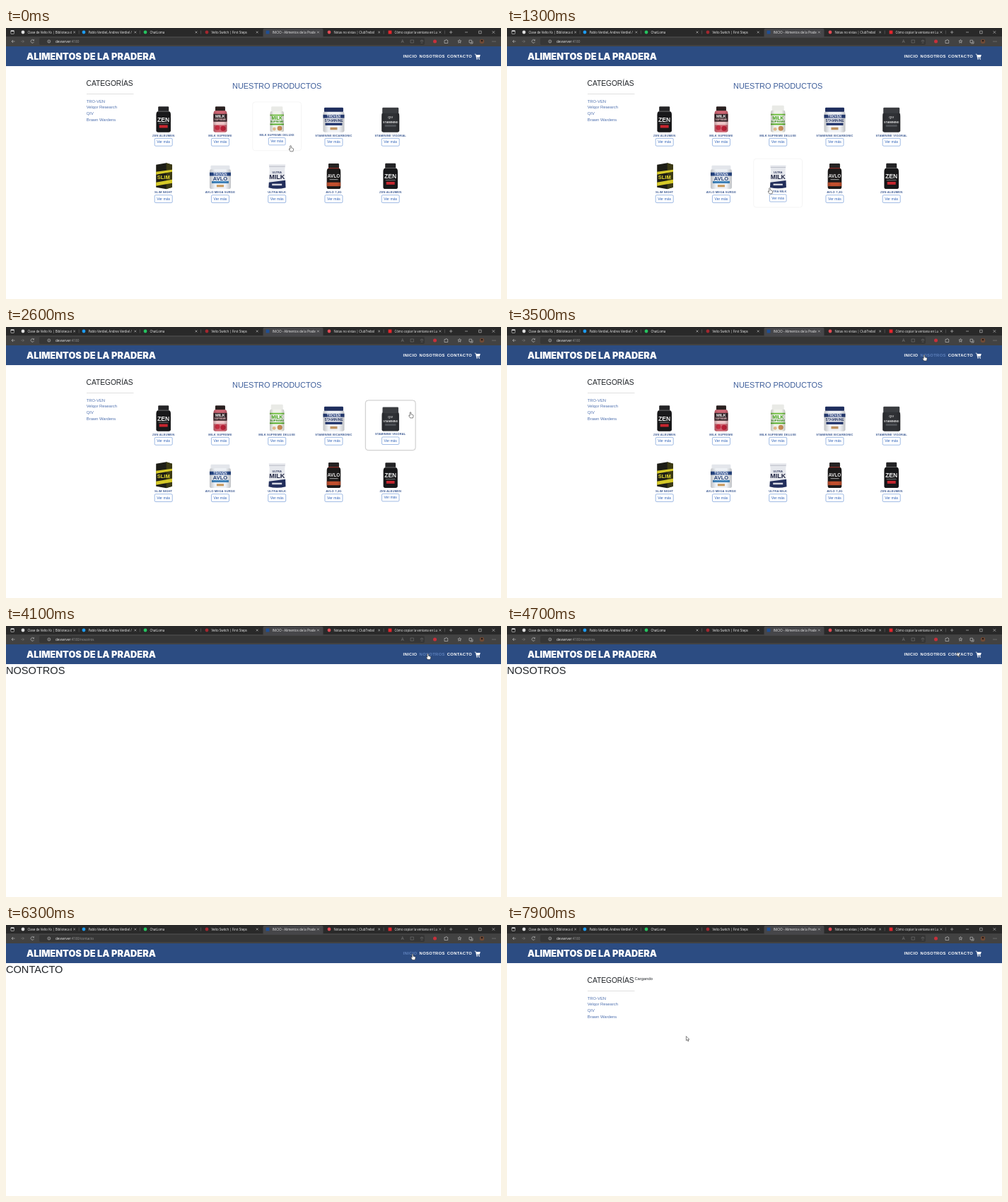
An HTML page for the animation above (8 s loop, 700 by 384 pixels).

```html
<!DOCTYPE html>
<html lang="es">
<head>
<meta charset="utf-8">
<title>Tienda</title>
<style>
html, body { margin: 0; width: 100%; height: 100%; overflow: hidden; background: #fff; }
svg { display: block; width: 100%; height: 100%; font-family: "Liberation Sans", Arial, sans-serif; }
.ui { font-family: "Open Sans", "Noto Sans", sans-serif; }
.brand { font-family: Inter, sans-serif; font-weight: 900; }
.nav { font-weight: 700; letter-spacing: .35px; }
.name { font-weight: 700; letter-spacing: .15px; }
.mid { text-anchor: middle; }
.tag { text-anchor: middle; font-weight: 700; }
.line { fill: none; stroke: #ccc; stroke-width: .6; }
</style>
</head>
<body>
<svg id="stage" viewBox="0 0 700 384" preserveAspectRatio="none"></svg>
<script>
const LOOP = 8000, STEP = 100;
const stage = document.getElementById('stage');

const text = (x, y, s, size, fill, cls = '', id = '') =>
  `<text x="${x}" y="${y}" font-size="${size}" fill="${fill}" class="${cls}" id="${id}">${s}</text>`;
const rect = (x, y, w, h, fill, r = 0, more = '') =>
  `<rect x="${x}" y="${y}" width="${w}" height="${h}" rx="${r}" fill="${fill}" ${more}/>`;
const dot = (x, y, r, fill) => `<circle cx="${x}" cy="${y}" r="${r}" fill="${fill}"/>`;
const line = (d, more = '') => `<path class="line" d="${d}" ${more}/>`;
const tag = (y, s, size, fill) => text(0, y, s, size, fill, 'tag');
const band = (w, y, h, fill) => rect(-w / 2, y, w, h, fill);

// Browser frame
const tabs = [
  [24, 'Clase de Velto Ks | Biblioteca d', '#ddd'],
  [110, 'Pablo Verdiel, Andres Verdiel / C', '#1d9bf0'],
  [197, 'ChatLoma', '#25c35f'],
  [284, 'Velto Switch | First Steps', '#a3272f'],
  [370, 'INICIO - Alimentos de la Pradera', '#1f4f94'],
  [457, 'Notas no vistas | ClubTrebol', '#e04b55'],
  [543, 'Cómo copiar la ventana en Lumo', '#e3262e']
];

function browser() {
  let s = rect(0, 0, 700, 13, '#292929') + rect(0, 12, 700, 14, '#424242') +
    rect(363.5, .8, 85, 13, '#464649', 2) + rect(47, 14, 545, 10, '#363636', 2);
  s += rect(6.8, 3.6, 4.6, 4.8, 'none', .7, 'stroke="#ddd" stroke-width=".6"') + rect(6.8, 3.6, 4.6, 1.4, '#ddd');
  tabs.forEach(([x, label, color], i) => {
    const end = 17 + (i + 1) * 86.2, clip = 'tab' + i;
    s += i > 3 && i != 5 ? rect(x - 2.4, 3.6, 4.8, 4.8, color) : dot(x, 6, 2.4, color);
    s += `<clipPath id="${clip}">${rect(x, 0, end - 10.5 - x, 12, '#000')}</clipPath>`;
    s += `<g clip-path="url(#${clip})">${text(x + 6.4, 7.6, label, 4.4, '#eee', 'ui')}</g>`;
    s += line(`M${end - 8} 4.6l2.8 2.8m0-2.8l-2.8 2.8`);
    if (i != 3 && i != 4) s += line(`M${end} 3.5v5`, 'opacity=".4"');
  });
  s += line('M627 6h4.4M629.2 3.8v4.4M649 6h4M668.6 4.2h3.6v3.6h-3.6zM687.6 4.2l3.6 3.6m0-3.6l-3.6 3.6');
  s += line('M12.4 19H8m2-2l-2 2 2 2M39.3 17.6a2.3 2.3 0 1 0 .2 2.2m-.1-3.6v1.6h-1.6');
  s += line('M21 19h4.4m-2-2l2 2-2 2', 'opacity=".4"');
  s += `<circle class="line" cx="60.8" cy="19" r="2"/>` + line('M60.8 18.7v1.4M60.8 17.7v.4');
  s += line('M559 21l1.7-4.4 1.7 4.4m-2.8-1.5h2.2M572 17h4.4v4H572zM586 18.6h4l-2-2zm.5 2.4h3', 'opacity=".4"');
  s += dot(606.5, 19, 2.5, '#c6303b');
  s += line('M620 17.5h1.7a1 1 0 0 1 2 0h1v4h-4.7zM639 18.2h1.6l.8-1.7.8 1.7h1.6l-1.2 1.2.4 1.8-1.6-1-1.6 1 .4-1.8z');
  s += line('M655 17.2h3.6v3.6H655zM656.4 22h3.6v-3.4');
  s += dot(673, 19, 3.3, '#6f4a36') + dot(673, 18, 1.3, '#241b18');
  for (const x of [688, 690, 692]) s += dot(x, 19, .45, '#ddd');
  return s + `<text x="70" y="20.7" font-size="4.7" class="ui" fill="#eee">devserver<tspan id="path" fill="#9a9a9a"></tspan></text>`;
}

function header() {
  const cart = '<path d="M662.7 36.8h1.7l.4 1.2h6l-1 3.8h-4.1l.2.9h3.9v.7h-4.5l-1.3-5.9h-1.3z" fill="#fff"/>';
  return rect(0, 26, 700, 28, '#2c4c82') +
    text(29, 45, 'ALIMENTOS DE LA PRADERA', 12.8, '#fff', 'brand') +
    text(561.6, 42.2, 'INICIO', 5.83, '#fff', 'nav', 'inicio') +
    text(584.6, 42.2, 'NOSOTROS', 5.83, '#fff', 'nav', 'nosotros') +
    text(623.8, 42.2, 'CONTACTO', 5.83, '#fff', 'nav', 'contacto') +
    cart + dot(666, 44, .75, '#fff') + dot(669.3, 44, .75, '#fff');
}

// Product art, drawn around the centre of its card
function jar(w, neck, top, lidH, body, lid, label) {
  const b = top + lidH, r = w / 2, n = neck / 2;
  const shape = fill => `<path d="M${-r} ${b + 5}Q${-r} ${b} ${-n} ${b}H${n}Q${r} ${b} ${r} ${b + 5}` +
    `V6Q${r} 8.4 ${r - 3} 8.4H${3 - r}Q${-r} 8.4 ${-r} 6Z" fill="${fill}"/>`;
  return rect(-n, top, neck, lidH + .5, lid, 1.2) + shape(body) + label + shape('url(#shade)');
}
const black = jar(20.5, 15, -28, 7, '#19191b', '#242426',
  band(15, -21.6, .8, '#777') + tag(-6.5, 'ZEN', 8.6, '#f2f2f2') +
  band(14, -4.6, .7, '#999') + band(12, -1.8, 4, '#c7262f'));
const products = [
  ['ZEN ALBUMEN', black],
  ['MILK SUPREME', jar(19, 14, -28, 6, '#cf6573', '#2a2020',
    band(19, -17.5, 11, '#33262a') + tag(-12.6, 'MILK', 5.6, '#fff') + tag(-8.2, 'SUPREME', 3.4, '#f5c9cf') +
    band(19, -6.5, 4.5, '#ecc6c8') + dot(-4, 2, 3.4, '#c52c41') + dot(4, 3, 3.6, '#b51f36'))],
  ['MILK SUPREME DELUXE', jar(20.5, 17, -29.5, 7, '#f0f1ec', '#e9eae6',
    band(20.5, -17.6, 2, '#73c043') + tag(-9.8, 'MILK', 6.6, '#43a518') + tag(-5.4, 'SUPREME', 4, '#3b8c20') +
    band(20.5, -4, 2, '#58b02c') + dot(4, 3, 3.5, '#c58b56') + dot(-4, 4, 2.4, '#dfb98b'))],
  ['STAMININE BICARBONIC', jar(30, 27, -26.5, 6, '#f0f2f5', '#1e2d5d',
    band(30, -16.5, 4.8, '#2b427d') + tag(-12.4, 'TROVEN', 4.6, '#fff') +
    tag(-6.4, 'STAMININE', 4.8, '#1b2c5e') + band(24, -4.8, 3.4, '#24376f') + band(10, 1.5, 3.5, '#bd9262'))],
  ['STAMININE VIGORAL', jar(25, 23, -26.5, 8, '#2f3135', '#3a3c40',
    tag(-11, 'QIV', 4, '#c9c9c9') + tag(-4.5, 'STAMININE', 4, '#e5e5e5') + band(16, -2.3, 3, '#4d5055'))],
  ['SLIM NIGHT', '<path d="M-10.5-26L4-28.5 12.3-26V6L4 8.6-10.5 6z" fill="#1d1d16"/>' +
    '<path d="M4-28.5L12.3-26V6L4 8.3z" fill="#3c3a14"/>' +
    '<path d="M-10.5-16L12.3-19V-16L-10.5-12zM-10.5-1L12.3-5V0L-10.5 4z" fill="#d5c928"/>' +
    tag(-6, 'SLIM', 7.5, '#e8dc30')],
  ['AVLO MEGA SURGE', jar(30, 27, -25, 5.5, '#eef1f5', '#e3e6eb',
    band(30, -15, 4.8, '#294b8d') + tag(-11, 'TROVEN', 4.6, '#fff') + tag(-4, 'AVLO', 7.5, '#1f3a70') +
    band(24, -2.8, 3.2, '#3f83ba') + band(10, 2.6, 3, '#c79759'))],
  ['ULTRA MILK', '<path d="M-11.5-26.5H12L11-19 12.3 6.5Q0 9.5-11.8 6.5L-10.5-19z" fill="#e6e8ed"/>' +
    '<path d="M-11.4-1L11.9-4 12.3 6.5Q0 9.5-11.8 6.5z" fill="#222e5b"/>' + rect(-11, -24, 22.4, 1, '#b9bdc7') +
    tag(-14, 'ULTRA', 4, '#30395d') + tag(-5.5, 'MILK', 9, '#1f2441') + band(14, 1, 2.5, '#d6d8e1')],
  ['AVLO 7,2G', jar(19.5, 15, -27.6, 7, '#1c1a1a', '#252323',
    band(15, -21.4, .9, '#b2322a') + tag(-7.5, 'AVLO', 6.6, '#f0f0f0') +
    band(12, -5.5, 1, '#aaa') + band(19.5, -1, 5.5, '#c2502e'))],
  ['ZEN ALBUMEN', black]
];
const HALF = 36.3;
const centre = i => [222.7 + i % 5 * 80.25, 139.3 + Math.floor(i / 5) * 80.4];

const card = ([name, art], i) => `<g id="card${i}">` +
  rect(-HALF, -HALF, 2 * HALF, 2 * HALF, 'none', 4, `id="edge${i}" stroke-width=".6"`) + art +
  text(0, 14.3, name, 4.1, '#3f5c94', 'name mid') +
  rect(-12.5, 17, 25, 10.9, '#fff', 1.6, 'stroke="#3f74c8" stroke-width=".5"') +
  text(0, 24.2, 'Ver más', 5.1, '#2f62b8', 'mid') + '</g>';

const brands = ['TRO-VEN', 'Velqor Research', 'QIV', 'Brawn Wardens'];
stage.innerHTML = `<defs><linearGradient id="shade">
  <stop offset="0" stop-opacity=".2"/><stop offset=".25" stop-opacity="0"/>
  <stop offset=".75" stop-opacity="0"/><stop offset="1" stop-opacity=".2"/></linearGradient></defs>` +
  rect(0, 0, 700, 384, '#fff') + browser() + header() +
  '<g id="home">' + text(113.6, 81.8, 'CATEGORÍAS', 10.2, '#212529') + line('M114 93.5h66.5') +
  brands.map((b, i) => text(113.8, 105.7 + i * 8.75, b, 5.83, '#4d6fae')).join('') + '</g>' +
  text(180.4, 78.3, 'Cargando', 5.83, '#212529', '', 'loading') +
  '<g id="shop">' + text(320, 86, 'NUESTRO PRODUCTOS', 10.95, '#3f5f9b') + products.map(card).join('') + '</g>' +
  text(0, 68.4, '', 14.58, '#212529', '', 'heading') +
  '<path id="cursor" stroke="#222" stroke-width=".55" fill="#fff" stroke-linejoin="round"/>';

// Motion
const HAND = 'M-.8.6Q0-.6.8.6V3.2L3.5 4Q4.3 4.3 4.1 5.4L3.4 8.4H-.4L-2.2 5.6Q-2.5 4.5-1.6 4.6L-.8 5.3Z';
const ARROW = 'M0 0V6.2L1.5 4.9 2.5 7.2 3.5 6.8 2.5 4.6H4.4Z';
const route = [
  [0, 402.5, 166.5], [100, 402.5, 166.5], [500, 392, 196], [900, 376, 224], [1300, 371.5, 226.5],
  [1500, 396, 256], [1800, 455, 307], [1900, 474, 313], [2200, 520, 250], [2470, 556, 174],
  [2600, 572, 120.5], [2800, 574, 116], [3200, 585, 62], [3500, 590, 39.5], [4000, 590, 39.5],
  [4700, 636.5, 37], [4900, 637.5, 38.5], [5400, 637.5, 38.5], [5800, 612, 44], [6200, 577, 42],
  [6300, 575, 41], [6900, 575, 41], [7100, 470, 85], [7400, 252.8, 157], [7800, 252.8, 157], [7900, 253.4, 157.6]
];
const links = { inicio: [6100, 7000], nosotros: [3400, 4300], contacto: [5000, 5600] };

function pointer(t) {
  const i = route.findIndex(p => p[0] > t);
  if (i < 0) return route[route.length - 1].slice(1);
  if (i == 0) return route[0].slice(1);
  const [t0, x0, y0] = route[i - 1], [t1, x1, y1] = route[i], k = (t - t0) / (t1 - t0);
  return [x0 + (x1 - x0) * k, y0 + (y1 - y0) * k];
}
function inside(i, t) {
  const [x, y] = pointer(t), [cx, cy] = centre(i);
  return Math.abs(x - cx) < HALF && Math.abs(y - cy) < HALF;
}
// Share of the last 300 ms spent over the card
function hover(i, t) {
  let n = 0;
  for (let k = 0; k < 12; k++) n += inside(i, t - k * 25);
  return n / 12;
}
const el = id => document.getElementById(id);
const show = (id, on) => el(id).setAttribute('visibility', on ? 'visible' : 'hidden');

function draw(now) {
  const t = Math.floor(now % LOOP / STEP) * STEP;
  const page = t < 3700 ? '' : t < 5400 ? 'nosotros' : t < 6900 ? 'contacto' : '';
  const shop = t < 3700;
  el('path').textContent = ':4180' + (page && '/' + page);
  el('heading').textContent = page.toUpperCase();
  show('home', !page);
  show('shop', shop);
  show('loading', t >= 6900);

  let hand = false;
  for (const id in links) {
    const on = t >= links[id][0] && t < links[id][1];
    el(id).setAttribute('fill', on ? '#5f82bd' : '#fff');
    hand = hand || on;
  }
  products.forEach((_, i) => {
    const [x, y] = centre(i), p = hover(i, t), over = inside(i, t), g = Math.round(80 + 158 * p);
    el('card' + i).setAttribute('transform', `translate(${x} ${y}) scale(${1 - .05 * p})`);
    // Hidden pages must not show the edge, so it inherits the shop's visibility
    el('edge' + i).setAttribute('stroke', over ? `rgb(${g},${g},${g})` : 'none');
    hand = hand || shop && over;
  });
  el('cursor').setAttribute('d', hand ? HAND : ARROW);
  el('cursor').setAttribute('transform', `translate(${pointer(t)})`);
}
function frame() {
  draw(performance.now());
  requestAnimationFrame(frame);
}
frame();
</script>
</body>
</html>
```
